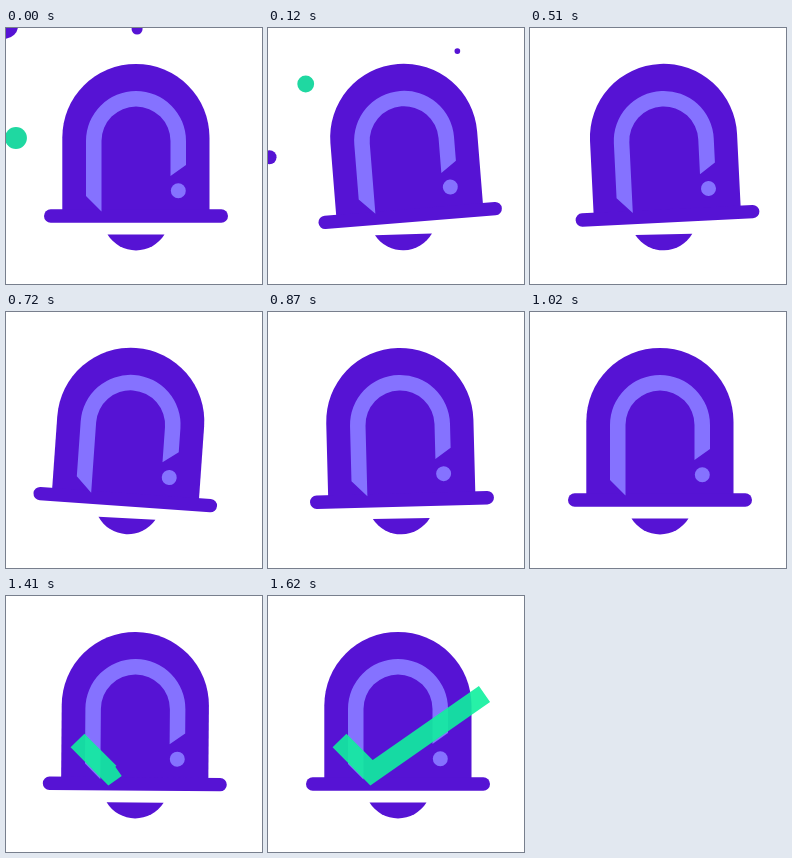
Animation, 256 px wide and 256 px high, one loop 3600 ms. Source, as an HTML page:

```html
<!DOCTYPE html>
<html lang="en">
<head>
<meta charset="utf-8">
<title>Bell</title>
<style>
html, body { margin: 0; width: 100%; height: 100%; overflow: hidden; background: #fff; }
svg { display: block; width: 100vw; height: 100vh; }
.bell { fill: #5613d4; }
.shine { fill: #8572ff; }
#check { fill: none; stroke: #10f09e; stroke-width: 19.5; stroke-miterlimit: 10; opacity: .9; }
</style>
</head>
<body>
<svg viewBox="0 0 256 256">
  <g id="dots"></g>
  <path id="clapper" class="bell" d="M101.5 206.5H158.5A33.5 33.5 0 0 1 101.5 206.5Z"/>
  <g id="body">
    <path class="bell" d="M56.3 188V109.5A73.6 73.6 0 0 1 203.5 109.5V188Z"/>
    <rect class="bell" x="38" y="181.3" width="184" height="13.4" rx="6.7"/>
    <path class="shine" d="M80 168V113A50 50 0 0 1 180 113V137L164.5 148V113A34.5 34.5 0 0 0 95.5 113V183.5Z"/>
    <circle class="shine" cx="172.3" cy="162.8" r="7.5"/>
  </g>
  <path id="check" pathLength="1" d="M71.5 144.5L103.5 176.7L216.5 98"/>
</svg>
<script>
const LOOP = 3600, STEP = 30;
const $ = id => document.getElementById(id);

// time, body angle, clapper angle at each turning point of the swing
const swing = [
  [0, 0, 0], [210, 7.5, 3], [400, -10, -7], [590, 10.6, 6.3], [750, -5.4, -3.9],
  [930, 3.8, 2.8], [1110, -3.8, -2.8], [1300, 2.3, 1.7], [1450, -1, -.7], [1570, 0, 0]
];

// dots spiral clockwise into the bell
const SPIN = .2475;
const dots = [
  { color: '#5613d4', angle: 148.4, dist: 165, pull: .304, size: 7, end: 510, fade: 100 },
  { color: '#5613d4', angle: 224.2, dist: 183, pull: .21, size: 13.3, end: 510, fade: 200 },
  { color: '#5613d4', angle: 270.5, dist: 124, pull: .05, size: 5.5, end: 250, fade: 250 },
  { color: '#1fd8a1', angle: 187.1, dist: 121, pull: .048, size: 11, end: 510, fade: 510 }
];

for (const d of dots) {
  d.node = document.createElementNS('http://www.w3.org/2000/svg', 'circle');
  d.node.setAttribute('fill', d.color);
  $('dots').append(d.node);
}

const clamp = x => Math.min(1, Math.max(0, x));
const ease = x => .5 - .5 * Math.cos(Math.PI * x);

function angleAt(t, col) {
  const i = swing.findIndex(k => k[0] > t);
  if (i < 0) return 0;
  const a = swing[i - 1], b = swing[i];
  return a[col] + (b[col] - a[col]) * ease((t - a[0]) / (b[0] - a[0]));
}

function tilt(id, deg) {
  $(id).setAttribute('transform', `rotate(${-deg} 130 36)`);
}

function drawDot(d, t) {
  const a = (d.angle + SPIN * t) * Math.PI / 180;
  const r = d.dist - d.pull * t;
  d.node.setAttribute('cx', 130 + r * Math.cos(a));
  d.node.setAttribute('cy', 125 + r * Math.sin(a));
  d.node.setAttribute('r', d.size * clamp((d.end - t) / d.fade));
}

function drawCheck(t) {
  const p = ease(clamp((t - 1290) / 330));
  const style = $('check').style;
  style.visibility = p > 0 ? 'visible' : 'hidden';
  style.strokeDasharray = p < 1 ? `${p} 2` : 'none';
}

function draw() {
  const t = Math.floor(performance.now() % LOOP / STEP) * STEP;
  tilt('body', angleAt(t, 1));
  tilt('clapper', angleAt(t, 2));
  dots.forEach(d => drawDot(d, t));
  drawCheck(t);
  requestAnimationFrame(draw);
}
draw();
</script>
</body>
</html>
```
